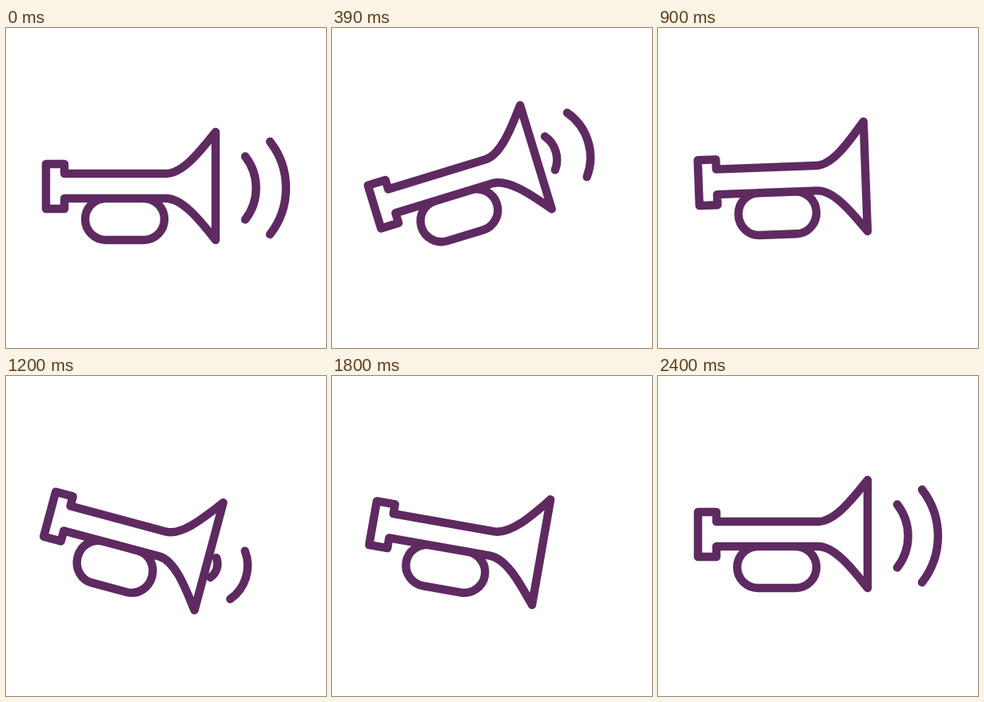
These frames come from a looping animation (400x400 px, 4430 ms). An HTML page with a canvas:

```html
<!DOCTYPE html>
<html lang="en">
<head>
<meta charset="utf-8">
<title>Trumpet</title>
<style>
  html, body { margin: 0; height: 100%; overflow: hidden; background: #fff; }
  canvas { display: block; width: 100vw; height: 100vh; }
</style>
</head>
<body>
<canvas id="stage" width="400" height="400"></canvas>
<script>
const ctx = document.getElementById('stage').getContext('2d');
const LOOP = 4430, STEP = 30, END = 2400;
const PIVOT = { x: 130, y: 200 }, TILT = 17, RAD = Math.PI / 180;

const progress = (t, from, to) => Math.min(1, Math.max(0, (t - from) / (to - from)));
const mix = (a, b, u) => a + (b - a) * u;
const smooth = u => u * u * (3 - 2 * u);

// Eased value through [time, value] points
const through = (points, t) => points.reduce((value, [time, next], i) =>
  i ? mix(value, next, smooth(progress(t, points[i - 1][0], time))) : next, 0);

const swing = [[0, 0], [393, -TILT], [552, -TILT], [1312, TILT], [1472, TILT], [2214, 0]];
const stretch = [[0, 0], [220, -.043], [600, .05], [1080, -.045], [1530, .045], [2000, -.017], [2300, 0]];
const drop = [[0, 0], [240, 3], [600, 1], [900, -7.2], [1530, -2.8], [2040, 1.8], [2300, 0]];

const trumpet = new Path2D(
  'M50 170H73V182H200C222 182 245 151 262 130V265C245 244 222 213 200 213H73V226H50Z' +
  'M125 213H172A26 26 0 0 1 172 265H125A26 26 0 0 1 125 213Z');

function drawTrumpet(t) {
  const s = through(stretch, t);
  const matrix = new DOMMatrix()
    .translate(PIVOT.x + 30 * s, PIVOT.y + through(drop, t))
    .rotate(through(swing, t))
    .scale(1 + s, 1 - 1.1 * s)
    .translate(-PIVOT.x, -PIVOT.y);
  const outline = new Path2D();
  outline.addPath(trumpet, matrix);
  ctx.stroke(outline);
}

// Each wave grows to its resting chord (x, half height h), then drifts on by dx, dh
const waves = [
  { x: 330, h: 58, dx: 37, dh: 20 },
  { x: 299, h: 39.5, dx: 28, dh: 14 }
];
const GROW = 424, LEAVE = 280, LIFE = 260, LAG = 100, ARC = 38 * RAD;
const blasts = [
  { born: -GROW - LAG, leave: 0, angle: 0, size: 1 },
  { born: 166, leave: 372, angle: -TILT, size: .885 },
  { born: 1066, leave: 1272, angle: TILT, size: .885 },
  { born: 1848, leave: END, angle: 0, size: 1 }
];

function drawWave(wave, { born, leave, angle, size }, t) {
  if (t < born || t > leave + LIFE) return;
  const grown = 1 - (1 - progress(t, born, born + GROW)) ** 2;
  const gone = progress(t, leave, leave + LEAVE) ** 2;
  const x = mix(259, wave.x, grown) + wave.dx * gone;
  const h = (mix(10, wave.h, grown) + wave.dh * gone) * size;
  ctx.save();
  ctx.translate(PIVOT.x, PIVOT.y);
  ctx.rotate(angle * RAD);
  ctx.beginPath();
  ctx.arc(x - PIVOT.x - h / Math.tan(ARC), 0, h / Math.sin(ARC), -ARC, ARC);
  ctx.stroke();
  ctx.restore();
}

function draw(t) {
  ctx.fillStyle = '#fff';
  ctx.fillRect(0, 0, 400, 400);
  ctx.strokeStyle = '#5e2a61';
  ctx.lineWidth = 10.4;
  ctx.lineCap = ctx.lineJoin = 'round';
  drawTrumpet(t);
  for (const blast of blasts)
    waves.forEach((wave, i) => drawWave(wave, blast, t - i * LAG));
}

const start = performance.now();
function frame(now) {
  const t = Math.max(0, now - start) % LOOP;
  draw(Math.min(Math.floor(t / STEP) * STEP, END));
  requestAnimationFrame(frame);
}
requestAnimationFrame(frame);
</script>
</body>
</html>
```
